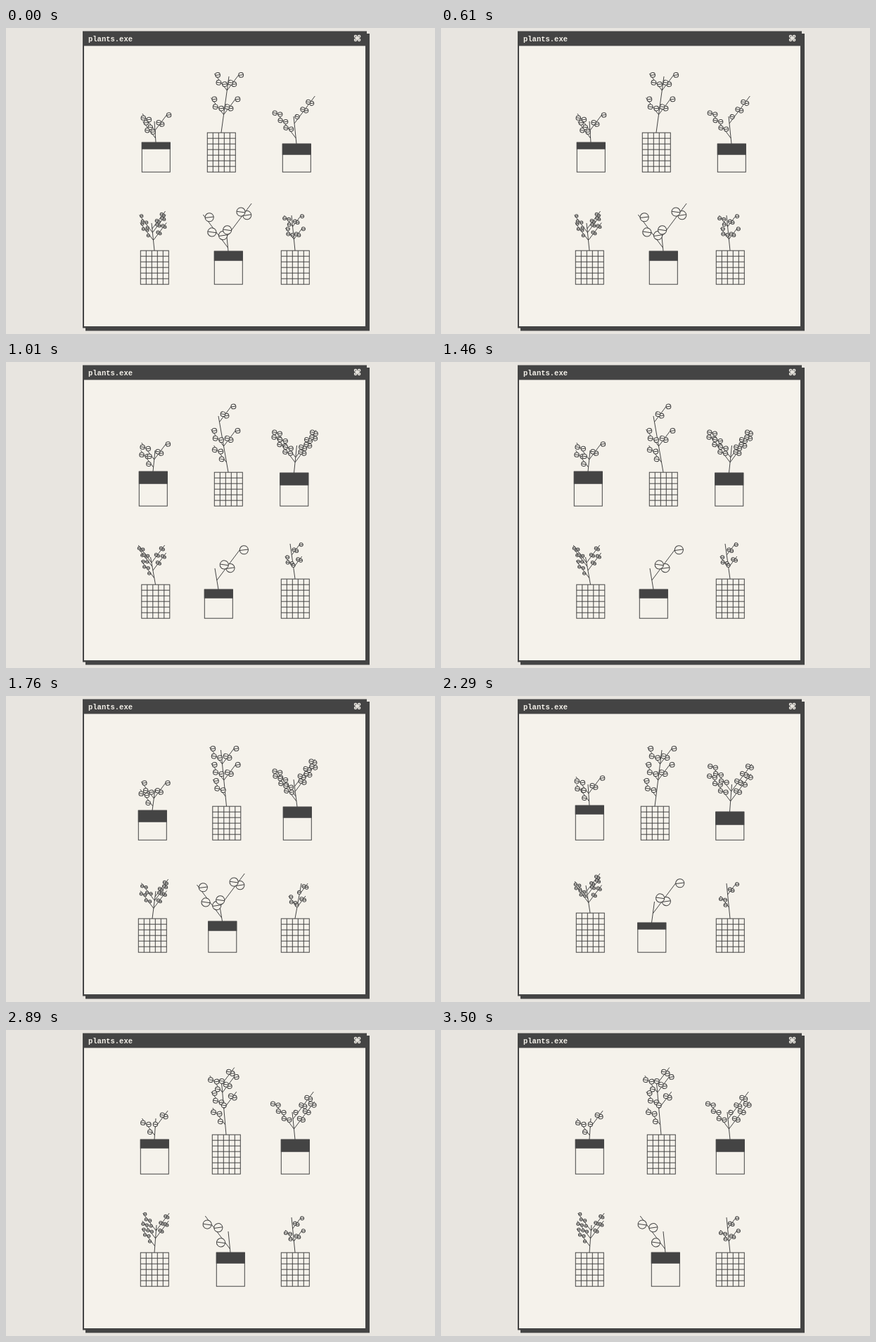
Animation, 610 px wide and 436 px high, one loop 3.9 s. Source, as an HTML page:

```html
<!DOCTYPE html>
<html lang="en">
<head>
<meta charset="utf-8">
<title>plants.exe</title>
<style>
  html, body { margin: 0; width: 100%; height: 100%; overflow: hidden; background: #e8e5e0; }
  svg { display: block; width: 100%; height: 100%; }
  .ink { fill: #444; }
  .paper { fill: #f5f2eb; }
  .title { font: bold 10.5px "Liberation Mono", "Courier New", monospace; }
  .key { font: bold 12px "DejaVu Sans", sans-serif; stroke: #f5f2eb; stroke-width: .4; }
  #plants { stroke: #444; stroke-width: 1; fill: none; }
</style>
</head>
<body>
<svg viewBox="0 0 610 436">
  <rect class="ink" x="113" y="8" width="404" height="423.5"/>
  <rect class="ink" x="109" y="4.5" width="404" height="423"/>
  <rect class="paper" x="111" y="25.5" width="400" height="399.5"/>
  <text class="paper title" x="117" y="19">plants.exe</text>
  <text class="paper key" x="499.5" y="19" text-anchor="middle">⌘</text>
  <g id="plants"></g>
</svg>
<script>
const POT = 40, CELL = 8, SLOPE = .75, PAIR = .18;
const holds = [1010, 750, 530, 600, 1010];

// Twigs sprout at heights first, first + step, ... up the trunk; each word of a
// plan names the twigs at one height. L/R: the leaves start with a pair,
// l/r: they start with a single leaf. Every plant: pot x, pot top, lean, band, plan.
const shrub = {
  bottom: 205, r: 3.2, trunk: 30, first: 6, step: 11, rise: 24, phase: .37, gap: .55,
  plants: [
    [193, 163, -2, 9, 'L lR'],
    [189, 156, 3, 17, 'l lR'],
    [188, 163, 4, 16, 'l LR'],
    [191, 156, -2, 12, 'l lR'],
    [191, 156, 2, 12, 'l r'],
  ],
};
const tree = {
  bottom: 205, r: 3.4, trunk: 80, first: 14, step: 11.5, rise: 24, phase: .37, gap: .55,
  plants: [
    [286, 149, 11, 0, '. LR . . LR'],
    [296, 157, -14, 0, 'l . LR . . R'],
    [293.5, 157, -8, 0, 'L . LR . LR'],
    [284, 157, 10, 0, 'L . LR . LR'],
    [293, 149, -7, 0, 'l . Lr . lR r'],
  ],
};
const bush = {
  bottom: 205, r: 3.1, trunk: 39, first: 8, step: 7, rise: 39, phase: .33, gap: .27,
  plants: [
    [393, 165, -4, 15, 'L . . r'],
    [389.5, 158, 4, 17, '. LR LR'],
    [394, 158, -5, 15, 'L L R R'],
    [390.5, 165, 3, 18, '. LR . LR'],
    [391, 156, -4, 17, '. LR . r'],
  ],
};
const fern = {
  bottom: 365, r: 2.1, trunk: 39, first: 9, step: 5.5, rise: 25, phase: .39, gap: .37,
  plants: [
    [191, 317, -4, 0, '. lR . lR R'],
    [192.5, 317, -7, 0, 'l . R l LR'],
    [188, 317, 5, 0, '. LR . LR R'],
    [192, 309, -6, 0, '. LR L R R'],
    [191, 317, 3, 0, 'l . LR . lR'],
  ],
};
const palm = {
  bottom: 365, r: 6.1, trunk: 30, first: 5, step: 8, rise: 47, phase: .37, gap: .55,
  plants: [
    [296, 318, -3, 13, 'L . r'],
    [282, 324, -5, 12, '. R'],
    [287.5, 321, -5, 13, 'L . r'],
    [279.5, 323, 4, 9, '. R'],
    [299, 317, -3, 15, 'l'],
  ],
};
const sprout = {
  bottom: 365, r: 2.5, trunk: 50, first: 16, step: 18, rise: 16, phase: .37, gap: .55,
  plants: [
    [391, 317, -5, 0, 'LR lR'],
    [391, 309, -7, 0, 'Lr R'],
    [391, 317, 9, 0, 'Lr r'],
    [391, 317, -5, 0, 'l R'],
    [391, 317, -5, 0, 'lR R'],
  ],
};
const garden = [shrub, tree, bush, fern, palm, sprout];

const line = (x1, y1, x2, y2) => `<path d="M${x1} ${y1}L${x2} ${y2}"/>`;
const box = (x, y, w, h, cls = '') => `<rect x="${x}" y="${y}" width="${w}" height="${h}" class="${cls}"/>`;

function leaf(x, y, r, side) {
  return `<g transform="translate(${x} ${y}) rotate(${side * -8})">` +
    `<circle r="${r}" class="paper"/>${line(-r, 0, r, 0)}</g>`;
}

function pot(x, top, bottom, band) {
  let out = box(x, top, POT, bottom - top);
  if (band) return out + box(x, top, POT, band, 'ink');
  for (let i = CELL; i < POT; i += CELL) out += line(x + i, top, x + i, bottom);
  for (let y = bottom - CELL; y > top; y -= CELL) out += line(x, y, x + POT, y);
  return out;
}

function twig(x, y, kind, { r, rise, phase, gap }) {
  const run = rise * SLOPE * (kind.toLowerCase() === 'l' ? -1 : 1);
  const single = kind === kind.toLowerCase();
  const base = single ? phase - gap / 2 : phase;
  let leaves = '';
  for (let i = single ? 1 : 0; ; i++) {
    const t = base + gap * (Math.floor(i / 2) + PAIR * (i % 2));
    if (t > 1) break;
    const side = i % 2 ? -1 : 1;
    leaves += leaf(x + run * t + side * r, y - rise * t, r, side);
  }
  return { stem: line(x, y, x + run, y - rise), leaves };
}

function plant(kind, [x, top, lean, band, plan]) {
  const root = x + POT / 2, { trunk, first, step, bottom } = kind;
  let stems = line(root, top, root + lean, top - trunk), leaves = '';
  plan.split(' ').forEach((word, level) => {
    const up = first + step * level;
    for (const letter of word.replace('.', '')) {
      const grown = twig(root + lean * up / trunk, top - up, letter, kind);
      stems += grown.stem;
      leaves += grown.leaves;
    }
  });
  return pot(x + .3, top + .2, bottom + .2, band) + stems + leaves;
}

const loop = holds.reduce((a, b) => a + b);
const stage = document.getElementById('plants');
let shown;

function draw(now) {
  let t = now % loop, scene = 0;
  while (t >= holds[scene]) t -= holds[scene++];
  if (scene === shown) return;
  shown = scene;
  stage.innerHTML = garden.map(kind => plant(kind, kind.plants[scene])).join('');
}

const start = performance.now();
function tick() {
  draw(performance.now() - start);
  requestAnimationFrame(tick);
}
tick();
</script>
</body>
</html>
```
